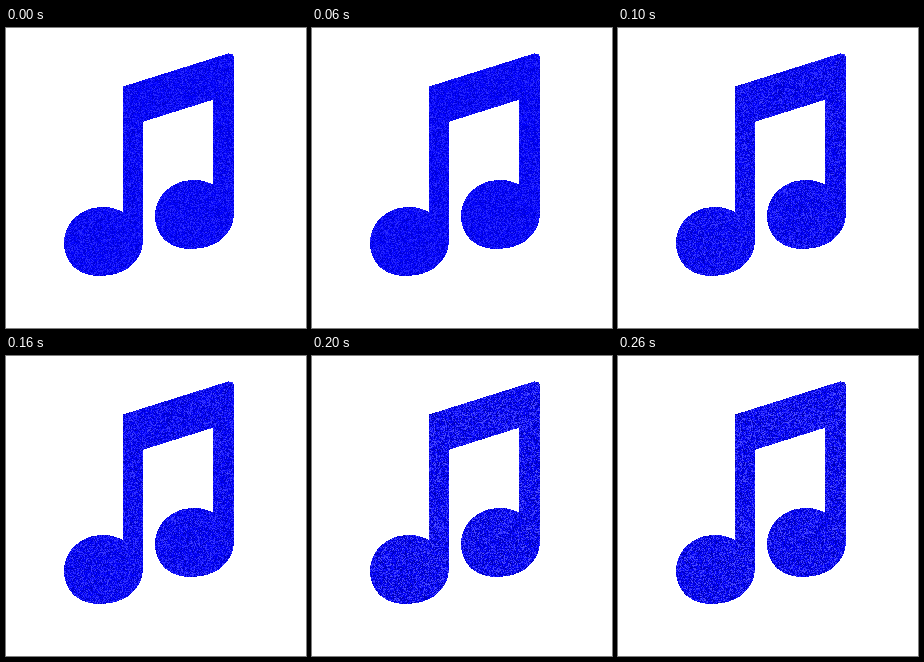
An HTML page with a canvas for the animation above (300 ms loop, 300x300 px).

```html
<!DOCTYPE html>
<html lang="en">
<head>
<meta charset="utf-8">
<title>Glittering music note</title>
<style>
  html, body { margin: 0; width: 100%; height: 100%; overflow: hidden; background: #fff; }
  .stage { position: relative; width: 300px; height: 300px; overflow: hidden; }
  canvas { position: absolute; left: 0; top: 0; animation: sparkle 300ms steps(3) infinite; }
  @keyframes sparkle { to { transform: translateX(-900px); } }
</style>
</head>
<body>
<div class="stage"><canvas id="strip" width="900" height="300"></canvas></div>
<script>
  const SIZE = 300;
  const GRAIN = [50, 68, 84]; // noise strength of each glitter pose
  const ctx = document.getElementById('strip').getContext('2d', { willReadFrequently: true });

  // Both heads share one outline, from the stem's outer side round to its inner side.
  const head = 'c0 23 -18 37 -44 37 c-21 0 -35 -14 -35 -33 c0 -20 17 -36 39 -36 c8 0 14 2 20 5';
  const note = new Path2D(
    `M117 58.5 L222 25.6 Q228 25 228 30 V184 ${head} H207 V71.7 L137 93.7 V211 ${head} H117 Z`);

  function seeded(seed) {
    return () => {
      seed = (seed + 0x6D2B79F5) | 0;
      let t = Math.imul(seed ^ (seed >>> 15), 1 | seed);
      t = (t + Math.imul(t ^ (t >>> 7), 61 | t)) ^ t;
      return ((t ^ (t >>> 14)) >>> 0) / 4294967296;
    };
  }

  function drawPose(grain, index) {
    const x = index * SIZE;
    ctx.setTransform(1, 0, 0, 1, x, 0);
    ctx.fillStyle = '#00f';
    ctx.fill(note);

    const random = seeded(index + 11);
    const image = ctx.getImageData(x, 0, SIZE, SIZE);
    const px = image.data;
    for (let i = 0; i < px.length; i += 4) {
      const inside = px[i + 3] > 127;
      const n = (random() * 2 - 1) * grain;
      px[i] = px[i + 1] = inside ? n : 255;
      px[i + 2] = inside ? 255 + n : 255;
      px[i + 3] = 255;
    }
    ctx.putImageData(image, x, 0);
  }

  GRAIN.forEach(drawPose);
</script>
</body>
</html>
```
